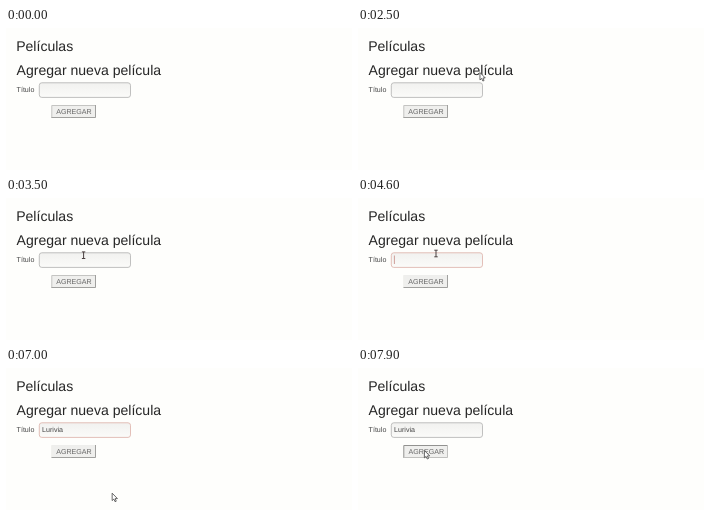
An HTML page for the animation above (8 s loop, 346 by 142 pixels).

```html
<!DOCTYPE html>
<html lang="es">
<head>
<meta charset="utf-8">
<title>Películas</title>
<style>
  html, body { margin: 0; width: 100%; height: 100%; overflow: hidden; background: #fefefc; }
  svg { display: block; width: 100%; height: 100%; font-family: "Liberation Sans", Arial, sans-serif; }
  text { text-rendering: geometricPrecision; }
  .heading { font-size: 14.05px; fill: #262626; }
  .label { font-size: 7.1px; fill: #444; }
  .field { fill: url(#shade); stroke: #b9b9b8; stroke-width: .9; }
  .focused .field { stroke: #e0b8b0; }
  .face { fill: #efefed; }
  .light, .dark { fill: none; }
  .light { stroke: #c4c4c2; }
  .dark { stroke: #a0a09e; }
  .focused .light { stroke: #eeeeec; }
  .pressed .light { stroke: #929290; }
  .pressed .dark { stroke: #c0c0be; }
  .caption { font-size: 7.1px; fill: #666; }
  .pressed .caption { transform: translate(.4px, .3px); }
</style>
</head>
<body>
<svg id="stage" viewBox="0 0 346 142">
  <defs>
    <linearGradient id="shade" x2="0" y2="1">
      <stop stop-color="#f1f1ef"/>
      <stop offset="1" stop-color="#fbfbf9"/>
    </linearGradient>
  </defs>

  <text class="heading" x="10.2" y="23.2">Películas</text>
  <text class="heading" x="10.6" y="47.2">Agregar nueva película</text>
  <text class="label" x="10.6" y="64.4">Título</text>

  <rect class="field" x="33.3" y="54.8" width="91.2" height="14.6" rx="2.5"/>
  <text class="label" id="value" x="36.1" y="64.4"></text>
  <path id="caret" d="M0 57.5V66" stroke="#bd7a74" stroke-width=".7"/>

  <g>
    <rect class="face" x="45.5" y="77" width="44.5" height="13"/>
    <path class="light" d="M45.8 90V77.5H90"/>
    <path class="dark" d="M45.5 89.5H89.5V77"/>
    <text class="caption" x="50.2" y="86">AGREGAR</text>
  </g>

  <g id="pointer">
    <path id="arrow" d="M.4 .5V7.9L2.1 6.4L3.3 9L4.5 8.5L3.4 5.9H5.7Z"
      fill="#fff" stroke="#444" stroke-width=".8" stroke-linejoin="round"/>
    <path id="beam" d="M-1.7 -3.3H1.7M0 -3.3V3.3M-1.7 3.3H1.7" fill="none" stroke="#4a4040"/>
  </g>
</svg>
<script>
  const LOOP = 8000, STEP = 100;
  const ENTER = 1200, FOCUS = 3600, TYPE = 4700, CARET_OFF = 5800, PRESS = 7900;
  const TITLE = "Lurivia";

  const $ = id => document.getElementById(id);
  const show = (node, on) => node.setAttribute("visibility", on ? "visible" : "hidden");
  const clamp = (v, low, high) => Math.min(high, Math.max(low, v));
  const easeOut = k => 1 - (1 - k) ** 2;
  const point = (x, y) => ({ x, y });

  // Each glide starts where the previous one ended; "via" bends it into a curve.
  const home = point(307, 78);
  const glides = [
    { start: 1100, end: 1500, to: point(161, 79.5), ease: easeOut },
    { start: 1800, end: 2000, to: point(159, 77) },
    { start: 2100, end: 3100, to: point(72, 42), via: point(110, 20) },
    { start: 3100, end: FOCUS, to: point(79, 61) },
    { start: 4500, end: 4600, to: point(78, 55.5) },
    { start: 6600, end: 7500, to: point(66, 82), via: point(139, 185) }
  ];

  function bend(a, b, c, k) {
    const mix = axis => (1 - k) ** 2 * a[axis] + 2 * k * (1 - k) * b[axis] + k * k * c[axis];
    return point(mix("x"), mix("y"));
  }

  function position(t) {
    return glides.reduce((from, { start, end, to, via, ease = k => k }) => {
      const k = ease(clamp((t - start) / (end - start), 0, 1));
      const middle = via || point((from.x + to.x) / 2, (from.y + to.y) / 2);
      return bend(from, middle, to, k);
    }, home);
  }

  // One slow first letter, then pairs of letters in quick bursts.
  function typedCount(t) {
    if (t < TYPE) return 0;
    return clamp(2 + 2 * Math.floor((t - TYPE - 400) / 150), 1, TITLE.length);
  }

  function draw(t) {
    const focused = t >= FOCUS && t < PRESS;
    $("stage").classList.toggle("focused", focused);
    $("stage").classList.toggle("pressed", t >= PRESS);

    const count = typedCount(t);
    $("value").textContent = TITLE.slice(0, count);
    const width = count ? $("value").getComputedTextLength() : 0;
    $("caret").setAttribute("transform", `translate(${36.4 + width} 0)`);
    show($("caret"), focused && t < CARET_OFF);

    const { x, y } = position(t);
    const overField = x > 33 && x < 125 && y > 54 && y < 70;
    $("pointer").setAttribute("transform", `translate(${x} ${y})`);
    show($("arrow"), t >= ENTER && !overField);
    show($("beam"), t >= ENTER && overField);
  }

  const start = performance.now();
  function tick() {
    const t = (performance.now() - start) % LOOP;
    draw(Math.floor(t / STEP) * STEP);
    requestAnimationFrame(tick);
  }
  tick();
</script>
</body>
</html>
```
